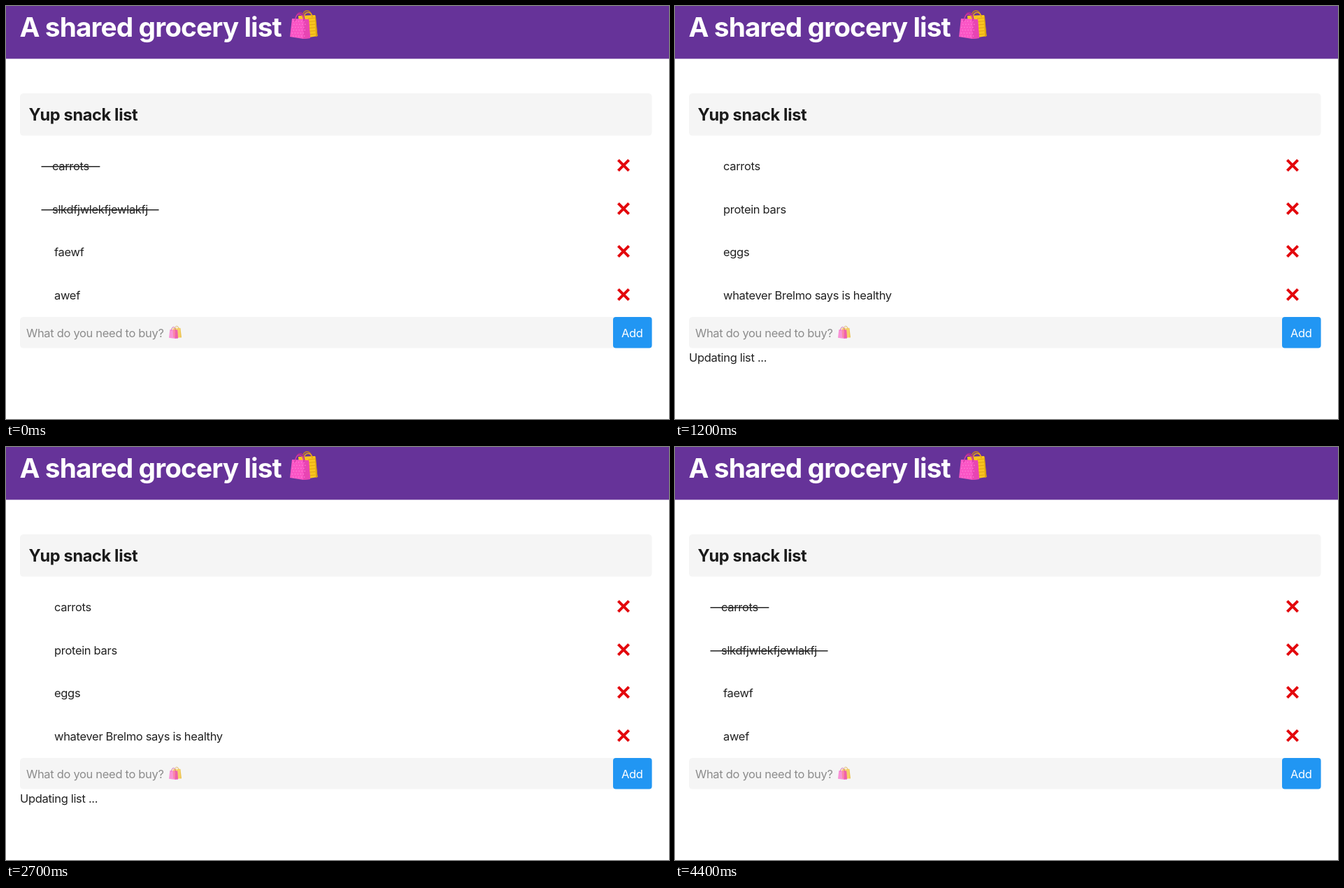
An HTML page with a canvas that plays this animation: 948 px wide and 591 px high, repeating every 4.5 s.

```html
<!DOCTYPE html>
<html lang="en">
<head>
<meta charset="utf-8">
<title>Shared grocery list</title>
<style>
  html, body { margin: 0; width: 100%; height: 100%; overflow: hidden; background: #fff; }
  canvas { display: block; width: 948px; height: 591px; }
</style>
</head>
<body>
<canvas id="stage" width="948" height="591"></canvas>
<script>
const ctx = document.getElementById('stage').getContext('2d');
const LOOP = 4500;
const ROWS = [235, 297, 358, 420];
const INK = '#222', PURPLE = '#663399', PALE = '#f5f5f5';
const FAMILY = 'Inter, "Open Sans", sans-serif';
const BODY = { font: '400 16.5px ' + FAMILY, gap: '-0.32px' };
const HEAD = { font: '700 38.8px ' + FAMILY, gap: '-0.9px' };
const SUB = { font: '700 23.6px ' + FAMILY, gap: '-0.36px' };

const FRESH = ['carrots', 'protein bars', 'eggs', 'whatever Brelmo says is healthy'];
const EDITED = ['carrots', 'slkdfjwlekfjewlakfj', 'faewf', 'awef'];

function text(str, x, y, color = INK, style = BODY, align = 'left') {
  ctx.font = style.font;
  ctx.letterSpacing = style.gap;
  ctx.textAlign = align;
  ctx.fillStyle = color;
  ctx.fillText(str, x, y);
}

function rect(x, y, w, h, color, radius = 0) {
  ctx.fillStyle = color;
  ctx.beginPath();
  ctx.roundRect(x, y, w, h, radius);
  ctx.fill();
}

function frame(x, y, w, h) {
  ctx.strokeStyle = '#d4d4d4';
  ctx.lineWidth = 1;
  ctx.strokeRect(x + 0.5, y + 0.5, w - 1, h - 1);
}

function poly(points, color) {
  ctx.fillStyle = color;
  ctx.beginPath();
  points.forEach(([x, y]) => ctx.lineTo(x, y));
  ctx.closePath();
  ctx.fill();
}

function cross(x, y) {
  const r = 7.6;
  ctx.strokeStyle = '#e3060c';
  ctx.lineWidth = 4;
  ctx.lineCap = 'butt';
  ctx.beginPath();
  ctx.moveTo(x - r, y - r);
  ctx.lineTo(x + r, y + r);
  ctx.moveTo(x + r, y - r);
  ctx.lineTo(x - r, y + r);
  ctx.stroke();
}

function handle(x, y, w, top, color) {
  ctx.strokeStyle = color;
  ctx.lineWidth = 1.4;
  ctx.beginPath();
  ctx.moveTo(x, y);
  ctx.bezierCurveTo(x + 1, top, x + w - 1, top, x + w, y);
  ctx.stroke();
}

// Two shopping bags inside a 40 px box.
function bags(x, y, size, alpha = 1) {
  ctx.save();
  ctx.translate(x, y);
  ctx.scale(size / 40, size / 40);
  ctx.globalAlpha = alpha;
  handle(18, 8, 13, -3, '#c88a12');
  poly([[12, 7], [36, 6], [39.5, 36], [27, 38], [14, 36]], '#f9c51e');
  poly([[36, 6], [37, 8], [39.5, 36], [37, 37]], '#dba011');
  ctx.strokeStyle = '#e3a514';
  ctx.lineWidth = 1;
  for (let i = 0; i < 6; i++) {
    ctx.beginPath();
    ctx.moveTo(26, 11 + i * 4.6);
    ctx.lineTo(36, 10 + i * 4.6);
    ctx.stroke();
  }
  handle(20, 9, 12, 0, '#e6a51a');
  handle(8, 13, 13, -1, '#b92a92');
  poly([[3, 11], [27, 12], [29, 39], [19, 40], [0, 37]], '#fa55c5');
  poly([[20, 12], [27, 12], [29, 39], [19, 40]], '#e845b3');
  ctx.fillStyle = '#ff86da';
  for (let r = 0; r < 6; r++) {
    for (let c = 0; c < 5; c++) {
      ctx.beginPath();
      ctx.arc(4.5 + c * 4 + (r % 2) * 1.6 - r * 0.3, 15 + r * 4.2, 0.75, 0, Math.PI * 2);
      ctx.fill();
    }
  }
  handle(7, 15, 13, 1, '#d13ba4');
  ctx.restore();
}

function header(x, baseline, bottom) {
  rect(0, 0, 948, bottom, PURPLE);
  text('A shared grocery list', x - 0.5, baseline, '#fff', HEAD);
  bags(x + 386, baseline - 36.5, 40);
}

function strike(str, baseline) {
  text(str, 66, baseline);
  const end = 66 + ctx.measureText(str).width + 15.5;
  rect(50.5, baseline - 6, end - 50.5, 1.5, INK);
}

function styledPage(items, struck, updating) {
  header(20, 43.5, 75.6);
  rect(20, 125, 903.6, 60.6, PALE, 5);
  text('Yup snack list', 32.5, 164, '#1b1b1b', SUB);
  items.forEach((item, i) => {
    if (i < struck) strike(item, ROWS[i]);
    else text(item, 69, ROWS[i]);
    cross(883, ROWS[i] - 7);
  });
  rect(20, 445, 852, 44.6, PALE, 5);
  text('What do you need to buy?', 29, 474, '#8c8c8c');
  bags(233, 458, 18, 0.6);
  rect(868, 445, 55.6, 44.6, '#2196f3', 4);
  text('Add', 880, 474, '#fff');
  if (updating) text('Updating list ...', 20, 509);
}

function plainPage() {
  header(-54, 18, 24.4);
  frame(-54, 51, 187, 30);
  text('Yup snack list', 53, 71, '#111', BODY, 'right');
  const ends = [-1, 36, -16.5, 187.5];
  FRESH.forEach((item, i) => {
    const y = 81 + i * 30, x = ends[i];
    text(item, x, y + 20.5, INK, BODY, 'right');
    frame(Math.round(x), y, 34, 30);
    cross(x + 16.5, y + 13.6);
  });
  frame(-54, 202, 187, 30);
  ctx.save();
  ctx.beginPath();
  ctx.rect(0, 202, 130, 30);
  ctx.clip();
  text('What do you need to buy?', -51, 223, '#757575');
  ctx.restore();
  frame(133, 202, 47, 30);
  text('Add', 141, 223, '#111');
  text('© 2019, Built with', 83, 251, INK, BODY, 'right');
  text('Dulvoy', 87, 251, '#551a8b');
  rect(87, 253, ctx.measureText('Dulvoy').width, 1.3, '#551a8b');
}

function draw(now) {
  const t = now % LOOP;
  rect(0, 0, 948, 591, '#fff');
  if (t >= 1000 && t < 1200) plainPage();
  else if (t >= 1200 && t < 2900) styledPage(FRESH, 0, true);
  else styledPage(EDITED, 2, false);
  requestAnimationFrame(draw);
}
requestAnimationFrame(draw);
</script>
</body>
</html>
```
